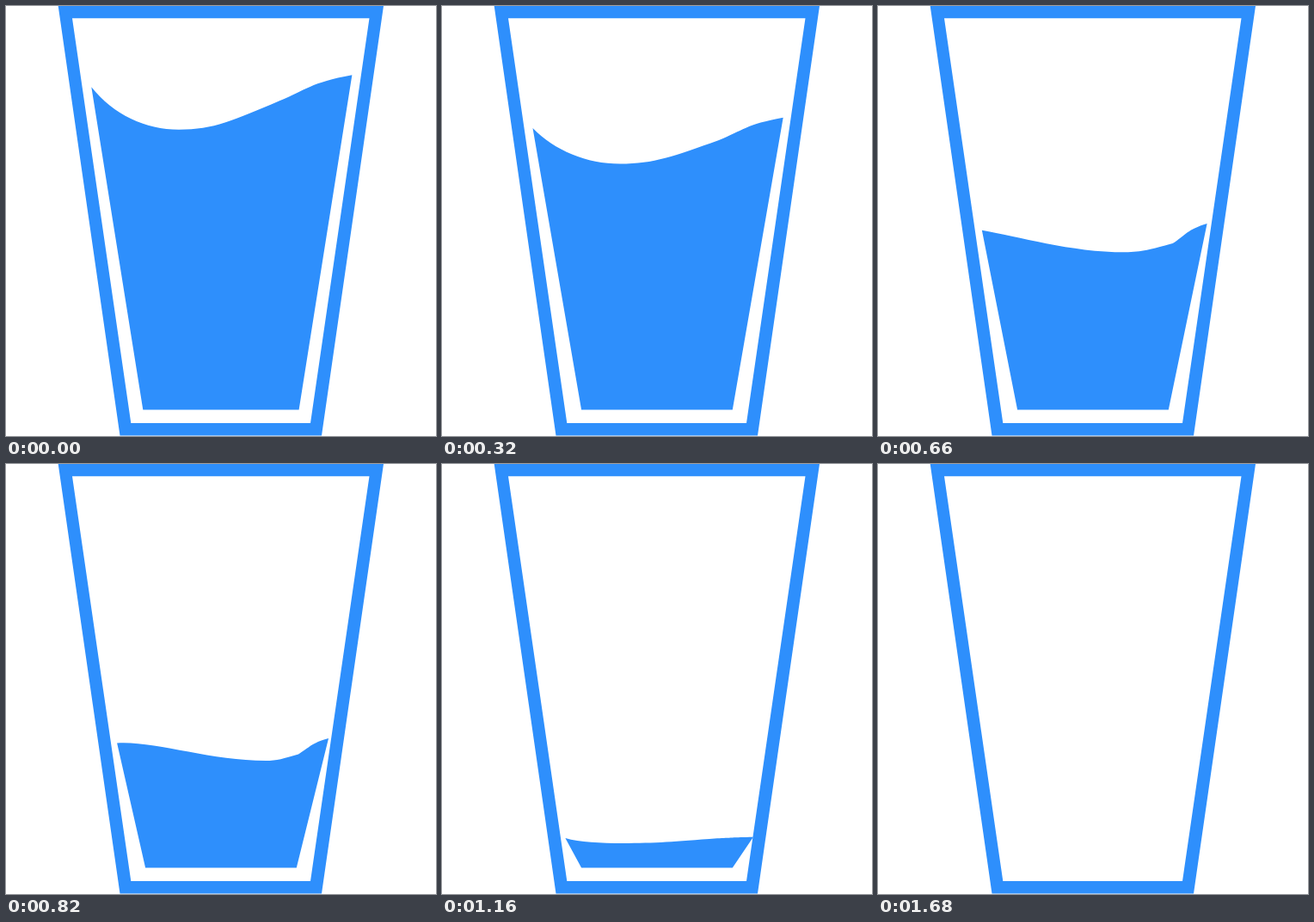
An HTML page that plays this animation: 500 px wide and 500 px high, repeating every 1.7 s.

```html
<!DOCTYPE html>
<html lang="en">
<head>
<meta charset="utf-8">
<title>Emptying glass</title>
<style>
  html, body { margin: 0; width: 100%; height: 100%; overflow: hidden; background: #fff; }
  svg { display: block; width: 100%; height: 100%; fill: #2e8ffc; }
</style>
</head>
<body>
<svg viewBox="0 0 500 500">
  <path fill-rule="evenodd" d="M60.7 0H439L367 499.5H132.5ZM77 14.2L145.3 485H354L422.5 14.2Z"/>
  <path id="water"/>
</svg>
<script>
const LOOP = 1700, STEP = 20;
const EMPTY = 1420, REFILL = 1540, BLINK = 1680;
const FLOOR = 469.4;

// lean: how steeply the surface drops from the left wall into the trough.
const waves = [
  { at: 0,    trough: 201, dip: 49.5, crest: 318, rise: 33.5, lean: 0.65 },
  { at: 320,  trough: 207, dip: 41.5, crest: 322, rise: 27.5, lean: 0.63 },
  { at: 520,  trough: 275, dip: 30,   crest: 345, rise: 12.5, lean: 0.63 },
  { at: 820,  trough: 302, dip: 20.5, crest: 340, rise: 7.5,  lean: -0.14 },
  { at: 1160, trough: 210, dip: 6,    crest: 320, rise: 5.7,  lean: 0.8 },
  { at: 1446, trough: 210, dip: 0,    crest: 320, rise: 0,    lean: 0.8 }
];

// Sine ease-in-out of the water level, already slightly under way at zero.
const drained = t => (1 - Math.cos(Math.PI * (t + 22) / 1468)) / 2;

const mix = (a, b, k) => a + (b - a) * k;
const between = (a, b, kx, ky) => [mix(a[0], b[0], kx), mix(a[1], b[1], ky)];

function waveAt(t) {
  const next = waves.findIndex(wave => wave.at > t);
  const a = waves[next - 1], b = waves[next];
  const from = drained(a.at);
  const k = (drained(t) - from) / (drained(b.at) - from);
  return Object.fromEntries(Object.keys(a).map(key => [key, mix(a[key], b[key], k)]));
}

function waterPath(t) {
  const level = drained(t), wave = waveAt(t);
  const left = [99.3 + 48.5 * level, 94 + 375 * level];
  const right = [402.4 - 44.5 * level, 80 + 389 * level];
  const trough = [wave.trough, left[1] + wave.dip];
  const crest = [wave.crest, trough[1] - wave.rise];
  const inset = 2.8 * Math.min(1, t / 320);
  const surface = [
    between(left, trough, 0.25, wave.lean), between(left, trough, 0.62, 1), trough,
    between(trough, crest, 0.35, 0), between(trough, crest, 0.54, 0.32), crest,
    between(crest, right, 0.37, 0.42), between(crest, right, 0.42, 0.7), right
  ];
  return `M${left}C${surface.join(" ")}L${340.6 - inset} ${FLOOR}H${159.3 + inset}Z`;
}

const water = document.getElementById("water");
const start = performance.now();

function draw() {
  const elapsed = (performance.now() - start) % LOOP;
  const t = Math.floor(elapsed / STEP) * STEP;
  const full = t >= REFILL && t < BLINK;
  const empty = t >= EMPTY && !full;
  water.setAttribute("d", empty ? "" : waterPath(full ? 0 : t));
  requestAnimationFrame(draw);
}
draw();
</script>
</body>
</html>
```
